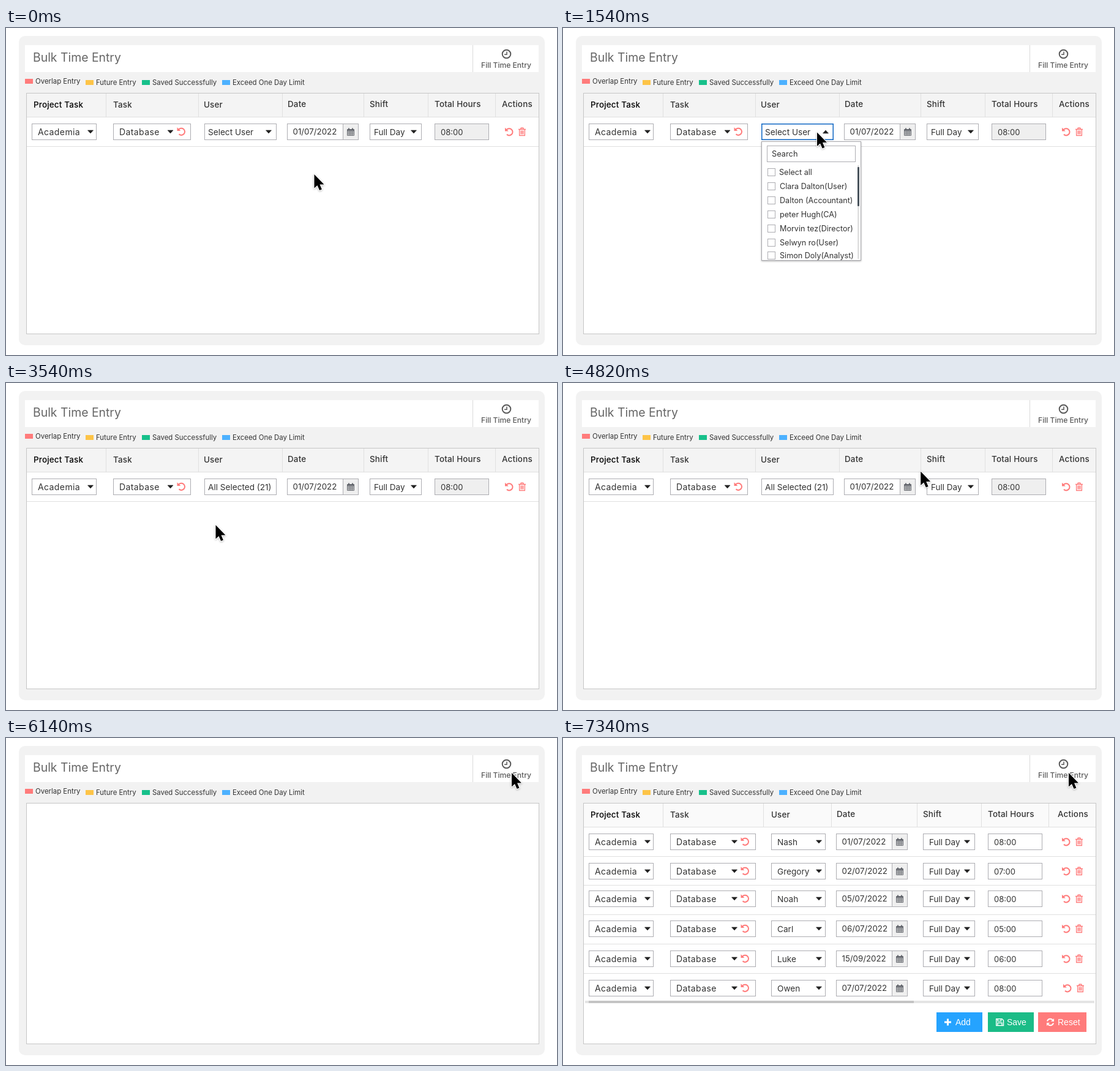
These frames come from a looping animation (900x534 px, 8 s). An HTML page:

```html
<!DOCTYPE html>
<html lang="en">
<head>
<meta charset="utf-8">
<title>Bulk Time Entry</title>
<style>
  html, body { margin: 0; width: 100%; height: 100%; overflow: hidden; background: #fff; }
  svg { display: block; width: 900px; height: 534px; font-family: Inter, sans-serif; }
  .btn { font: 14px "Liberation Sans", Arial, sans-serif; }
</style>
</head>
<body>
<svg id="stage" viewBox="0 0 900 534" fill="#333"></svg>
<script>
const RED = '#ff7b7b', BLUE = '#0f66c3', LINE = '#e0e0e0', EDGE = '#c6c6c6', FIELD = '#adadb2';

const rect = (x, y, w, h, fill, more = '') =>
  `<rect x="${x}" y="${y}" width="${w}" height="${h}" fill="${fill}" ${more}/>`;
const box = (x, y, w, h, fill = '#fff', stroke = FIELD) => rect(x, y, w, h, fill, `stroke="${stroke}"`);
const text = (x, y, size, s, more = '') => `<text x="${x}" y="${y}" font-size="${size}" ${more}>${s}</text>`;
const path = (d, more = '') => `<path d="${d}" ${more}/>`;
const line = (d, color, width = 1) => path(d, `fill="none" stroke="${color}" stroke-width="${width}"`);
const at = (x, y, s) => `<g transform="translate(${x} ${y})">${s}</g>`;
const group = (id, s) => `<g id="${id}">${s}</g>`;

const caret = (x, up) => path(up ? `M${x - 4.5} 172h9l-4.5 -5z` : `M${x - 4.5} 167h9l-4.5 5z`,
  'fill="#222" stroke="#222" stroke-width=".6" stroke-linejoin="round"');
const undo = (x, y) => at(x, y,
  line('M-4.6 -3A5.6 5.6 0 1 1 -4 4.3', RED, 2) + path('M-7 -6.8V-1H-1.2Z', `fill="${RED}"`));
const trash = (x, y) => at(x, y,
  line('M-6 -4H6M-2.5 -4L-1.8 -6.2H1.8L2.5 -4', RED, 1.4) +
  line('M-4.4 -4V6H4.4V-4M-1.9 -2V4M0 -2V4M1.9 -2V4', RED, 1.3));
const calendar = (x, y) => at(x, y,
  line('M-5.5 -4.5H5.5V5.5H-5.5ZM-5.5 -1.5H5.5M-5.5 .8H5.5M-5.5 3.1H5.5M-2.7 -1.5V5.5M0 -1.5V5.5M2.7 -1.5V5.5', '#5c5f66', .9) +
  line('M-5.5 -3.2H5.5', '#5c5f66', 1.6) + line('M-3 -6.5V-3M3 -6.5V-3', '#5c5f66', 1.8));

const wide = { heads: [45, 175, 323, 460, 594, 700, 810], cuts: [163.5, 314.5, 451.5, 584.5, 689.5, 799.5],
  tint: '#f4f4f4', taskW: 126, taskCaret: 268.5, undo: 286.5, user: 324.5, userW: 117,
  date: 459.5, shift: 594.5, shiftPad: 6.5, hours: 700.5, hoursFill: '#efefef' };
const filled = { heads: [45, 175, 340, 447, 588, 694, 808], cuts: [163.5, 327.5, 438.5, 578.5, 683.5, 793.5],
  tint: '#fafafa', taskW: 139, taskCaret: 280, undo: 297.5, user: 340.5, userW: 88,
  date: 446.5, shift: 588.5, shiftPad: 9.5, hours: 694.5, hoursFill: '#fff' };

const titles = ['Project Task', 'Task', 'User', 'Date', 'Shift', 'Total Hours', 'Actions'];
const header = L => rect(34, 107, 836, 38, L.tint) +
  line('M34 145.5H870', LINE) +
  L.cuts.map(x => line(`M${x} 107V145`, LINE)).join('') +
  titles.map((s, i) => text(L.heads[i], i < 3 ? 130 : 129, 13.4, s,
    `font-weight="500" letter-spacing=".2" fill="${i ? '#333' : '#000'}"`)).join('');

function row(L, dy, user, date, hours, nudge = 0) {
  const spaced = 'letter-spacing=".4"';
  return at(0, dy,
    box(42.5, 156.5, 105, 26) + text(52, 175, 14, 'Academia', spaced) + caret(138) +
    box(175.5, 156.5, L.taskW, 26) + text(185, 175, 14, 'Database', spaced) + caret(L.taskCaret) + undo(L.undo, 169) +
    box(L.user, 156.5, L.userW, 26) + (user && text(350, 175, 13.6, user) + caret(418)) +
    box(L.date, 156.5, 116, 26) + box(L.date + 91, 156.5, 25, 26, '#efefef') +
    text(L.date + 9, 174, 13.3, date) + calendar(L.date + 103.5, 170) +
    box(L.shift, 156.5, 84, 26) + text(L.shift + L.shiftPad, 174.5, 13.5, 'Full Day') + caret(L.shift + 71.5) +
    box(L.hours, 156.5, 88, 26, L.hoursFill) + text(L.hours + 9.5, 175, 13, hours) +
    undo(822 + nudge, 169.5) + trash(843 + nudge, 169.5));
}

const entries = [
  [0, 'Nash', '01/07/2022', '08:00'], [48, 'Gregory', '02/07/2022', '07:00'],
  [93, 'Noah', '05/07/2022', '08:00'], [142, 'Carl', '06/07/2022', '05:00'],
  [191, 'Luke', '15/09/2022', '06:00'], [239, 'Owen', '07/07/2022', '08:00', 2]];
const rowEnds = [193.5, 240.5, 288.5, 336.5, 384.5, 431.5];

const people = ['Select all', 'Clara Dalton(User)', 'Dalton (Accountant)', 'peter Hugh(CA)',
  'Morvin tez(Director)', 'Selwyn ro(User)', 'Simon Doly(Analyst)'];
const checkY = i => i < 6 ? 229.5 + 23 * i : 365.5;
const tick = i => box(334.5, checkY(i), 12, 12, BLUE, BLUE) +
  line(`M337 ${checkY(i) + 6}l2.6 2.8 4.8 -5.4`, '#fff', 1.6);

const dropdown = box(324.5, 156.5, 117, 26, '#fff', BLUE) + box(325, 157, 116, 25, 'none', BLUE) +
  text(330, 175, 13.6, 'Select User') + caret(429, true) +
  rect(324.5, 185.5, 162, 194, '#fff', 'stroke="#a8a8ad" filter="url(#soft)"') +
  box(333.5, 192.5, 144, 26) + text(341, 210, 12.8, 'Search') +
  people.map((s, i) => box(334.5, checkY(i), 12, 12) +
    text(i ? 354 : 353, checkY(i) + 10.5, 12.6, s)).join('') +
  rect(481, 224, 3, 153, '#e2e2e2') + rect(481, 227, 3, 64, '#4b555e', 'rx="1"') +
  group('tickAll', tick(0)) + group('tickRest', people.map((_, i) => i ? tick(i) : '').join(''));

const buttons = rect(36, 429, 832, 4, '#e4e4e4') + rect(42, 429, 531, 4, '#c4c4c4') +
  rect(610, 448, 75, 32, '#25a3ff') + rect(694, 448, 75, 32, '#1bbc87') + rect(776, 448, 79, 32, RED) +
  line('M623 464H634M628.5 458.5V469.5', '#fff', 3) +
  line('M707.7 458.7H717L719.5 461.2V469.5H707.7ZM710 469.5V465.3H717V469.5M710 458.7V462.4H715.5V458.7', '#fff', 1.4) +
  line('M791 462.5A5.2 5.2 0 0 1 800 460.6M801 465.5A5.2 5.2 0 0 1 792 467.4', '#fff', 2) +
  path('M802 458V463H797ZM790 470V465H795Z', 'fill="#fff"') +
  [[641, 'Add'], [725, 'Save'], [808, 'Reset']].map(([x, s]) =>
    `<text class="btn" x="${x}" y="469" fill="#fff">${s}</text>`).join('');

const legend = [[31, 83, RED, 'Overlap Entry'], [130, 85, '#fdc448', 'Future Entry'],
  [222, 85, '#17c08a', 'Saved Successfully'], [353, 85, '#4db1ff', 'Exceed One Day Limit']];

const stage = document.getElementById('stage');
stage.innerHTML = `<defs><filter id="soft" x="-30%" y="-30%" width="160%" height="160%">
  <feDropShadow dx="0" dy="1" stdDeviation="1.5" flood-opacity=".3"/></filter></defs>` +
  rect(21, 13, 859, 505, '#f2f2f2', 'rx="10"') + rect(31, 28, 839, 44, '#fff') +
  line('M762.5 28V72', '#d9d9d9') + text(44, 55, 19.4, 'Bulk Time Entry', 'fill="#666"') +
  '<circle cx="817.5" cy="42.5" r="6.8" fill="none" stroke="#5a5a5a" stroke-width="2"/>' +
  line('M818 38.5V43.2H814', '#5a5a5a', 1.5) +
  text(776, 65, 12.1, 'Fill Time Entry', 'id="fill" font-weight="500"') +
  legend.map(([x, y, c, s]) => rect(x, y, 13, 8, c) + text(x + 17, y + 8, 11.4, s)).join('') +
  group('panel', box(33.5, 106.5, 837, 393, '#fff', EDGE)) +
  group('single', header(wide) + row(wide, 0, '', '01/07/2022', '08:00') + line('M34 193.5H870', LINE) +
    group('closed', text(330, 175, 13.6, 'Select User') + caret(429)) +
    group('chosen', text(330, 175, 13.6, 'All Selected (21)')) +
    group('open', dropdown)) +
  group('result', group('sheet', rect(33, 106, 838, 402, '#fff')) + header(filled) +
    entries.map((e, i) => group('row' + i, row(filled, ...e) +
      (i < 5 ? line(`M34 ${rowEnds[i]}H870`, LINE) : ''))).join('') +
    path('', `id="sides" fill="none" stroke="${EDGE}"`) + group('buttons', buttons)) +
  group('cursor', path('M0 0V22.5L5 18L8.6 26L12.4 24.4L9 16.6H16Z',
    'fill="#000" stroke="#fff" stroke-width="2" paint-order="stroke" stroke-linejoin="round" filter="url(#soft)"'));

const el = id => document.getElementById(id);
const show = (id, on) => { el(id).style.display = on ? '' : 'none'; };

// Each move: start, number of 40 ms steps, end point
const moves = [[1040, 6, 415, 170.5], [2080, 5, 342.5, 232], [4580, 14, 826, 57]];
function cursorAt(t) {
  let x = 503.5, y = 239;
  for (const [start, n, ex, ey] of moves) {
    const k = Math.max(0, Math.min(n, Math.floor((t - start) / 40) + 1)) / n;
    x += (ex - x) * k;
    y += (ey - y) * k;
  }
  return [x, y];
}

function draw(now) {
  const t = now % 8000;
  const open = t >= 1540 && t < 3540, done = t >= 7340;
  const rows = Math.max(0, Math.min(6, Math.floor((t - 6640) / 100)));
  show('single', t < 6140);
  show('closed', t < 1540);
  show('open', open);
  show('chosen', t >= 3540);
  show('tickAll', t >= 2540);
  show('tickRest', t >= 3040);
  show('result', t >= 6640);
  show('sheet', !done);
  entries.forEach((_, i) => show('row' + i, i < rows));
  show('buttons', done);
  const bottom = done ? 499.5 : rows ? rowEnds[rows - 1] : 145.5;
  el('sides').setAttribute('d', `M33.5 ${bottom}V106.5H870.5V${bottom}`);
  el('fill').setAttribute('fill', t >= 5140 && t < 5640 ? BLUE : '#5a5a5a');
  el('cursor').setAttribute('transform', `translate(${cursorAt(t)})`);
}

const began = performance.now();
function tickFrame() {
  draw(performance.now() - began);
  requestAnimationFrame(tickFrame);
}
tickFrame();
</script>
</body>
</html>
```
